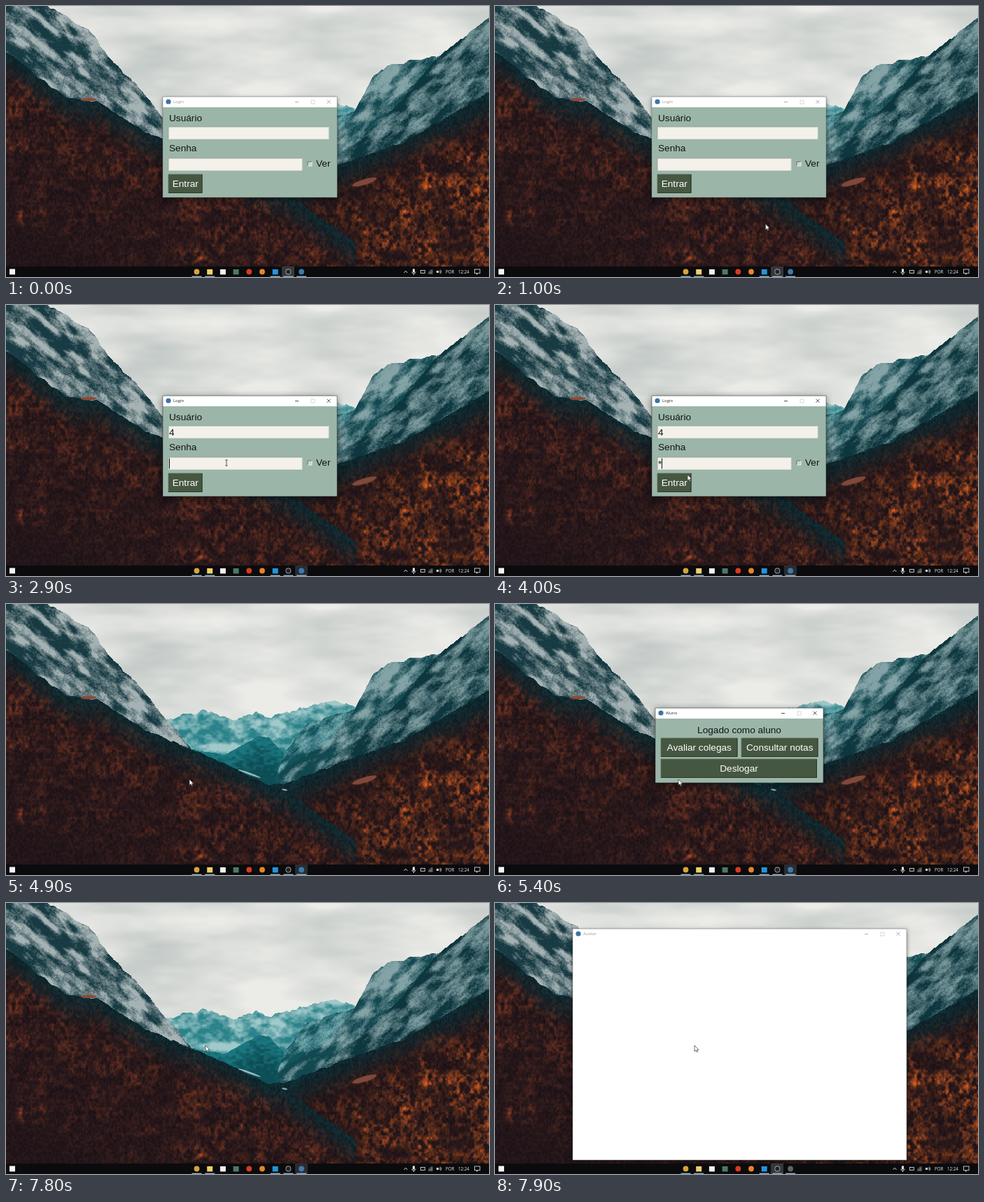
Write an HTML page with a canvas that moves like this. It is 690 px wide and 388 px high and loops after 8000 ms.

```html
<!DOCTYPE html>
<html lang="pt">
<head>
<meta charset="utf-8">
<title>Login</title>
<style>
html, body { margin: 0; width: 100%; height: 100%; overflow: hidden; background: #0b0b0c; }
canvas { display: block; width: 100vw; height: 100vh; }
</style>
</head>
<body>
<canvas id="stage" width="690" height="388"></canvas>
<script>
const W = 690, H = 388, LOOP = 8000;
const ctx = document.getElementById('stage').getContext('2d');
const SANS = '"Liberation Sans", Arial, sans-serif';
const UI = '"Open Sans", "Noto Sans", sans-serif';
const SAGE = '#9cb5a9', INK = '#101412';

const clamp = v => Math.max(0, Math.min(1, v));
const mix = (a, b, k) => a + (b - a) * k;
const blend = (a, b, k) => a.map((v, i) => mix(v, b[i], k));
const ease = k => k * k * (3 - 2 * k);

// ---- seeded noise ----
function hash(x, y) {
  let n = Math.imul(x, 374761393) + Math.imul(y, 668265263) | 0;
  n = Math.imul(n ^ (n >>> 13), 1274126177);
  return ((n ^ (n >>> 16)) >>> 0) / 4294967296;
}
function noise(x, y) {
  const i = Math.floor(x), j = Math.floor(y), u = ease(x - i), v = ease(y - j);
  return mix(mix(hash(i, j), hash(i + 1, j), u), mix(hash(i, j + 1), hash(i + 1, j + 1), u), v);
}
const fbm = (x, y) =>
  (noise(x, y) * 4 + noise(x * 2 + 9, y * 2) * 2 + noise(x * 4, y * 4 + 7)) / 7;
const glow = (x, y, cx, cy, rx, ry) => Math.exp(-(((x - cx) / rx) ** 2) - ((y - cy) / ry) ** 2);

// ---- landscape: each layer is a ridge line and a colour rule ----
function ridge(jag, ...pts) {
  return x => {
    const i = pts.findIndex(p => p[0] > x);
    if (i < 1) return Infinity;
    const [x0, y0] = pts[i - 1], [x1, y1] = pts[i];
    return mix(y0, y1, (x - x0) / (x1 - x0)) + jag * (fbm(x / 9, jag) - 0.5);
  };
}
// dir is 1 for slopes falling to the right, -1 to the left
function rock(dark, light, dir, bias) {
  return (x, y) => {
    const along = dir * x * 0.76 + y * 0.65, across = y * 0.76 - dir * x * 0.65;
    const grain = (noise(x / 1.6, y / 1.6) - 0.5) * 0.45;
    return blend(dark, light, clamp((fbm(along / 24, across / 9) - 0.5) * 2.4 + grain + bias(x, y)));
  };
}
function forest(x, y, warmth, heat, leaf) {
  const base = blend([13, 41, 47], [34, 21, 25], clamp(warmth));
  const crown = clamp((fbm(x / 5, y / 6) - 0.32) * 2);
  const patch = clamp(fbm(x / 26, y / 18) * 1.8 - 0.3);
  const shade = 0.75 + 0.5 * noise(x / 2, y / 3);
  return blend(base, leaf, heat * crown * patch).map(v => v * shade);
}
function leftForest(x, y, d) {
  const tree = glow(x, y, 48, 303, 8, 11) + glow(x, y, 22, 303, 5, 9) + glow(x, y, 265, 359, 15, 13);
  const heat = 0.75 * clamp(d / 40) * clamp(1.35 - d / 190) + 1.6 * tree;
  return forest(x, y, d / 45, Math.min(1.3, heat), [142, 62, 35]);
}
function rightForest(x, y) {
  const d = y - (262 - 0.45 * (x - 420));
  const heat = clamp(d / 75) * (0.45 + 0.55 * clamp((x - 420) / 150));
  return forest(x, y, (d + 10) / 45, heat, [188, 83, 31]);
}
function farRange(x, y, d) {
  const snow = glow(x, y, 386, 172, 11, 8) + glow(x, y, 310, 205, 42, 6) + glow(x, y, 472, 141, 12, 4);
  const k = (fbm(x / 9, y / 7) - 0.5) * 1.8 + 0.55 - d / 130 + snow;
  return blend([43, 130, 138], [160, 201, 202], clamp(k));
}
function sky(x, y) {
  const grey = glow(x, y, 190, 65, 80, 45) + 0.8 * glow(x, y, 465, 55, 85, 42) +
    glow(x, y, 690, 0, 70, 22) + 0.5 * glow(x, y, 140, 0, 80, 25);
  const k = (fbm(x / 75, y / 24) - 0.5) * 0.9 + 0.85 - 0.5 * grey;
  return blend([186, 194, 192], [235, 235, 231], clamp(k));
}
// front to back
const LAYERS = [
  [ridge(5, [0, 66], [85, 131], [130, 136], [200, 181], [264, 207], [405, 272], [500, 340]), leftForest],
  [ridge(8, [0, -40], [62, 0], [118, 33], [150, 77], [185, 111], [265, 208]),
    rock([24, 59, 67], [166, 179, 180], 1, (x, y) =>
      0.55 - 0.25 * glow(x, y, 25, 12, 55, 35) - 0.45 * glow(x, y, 148, 82, 20, 24))],
  [ridge(6, [345, 262], [400, 256], [478, 226], [570, 193], [655, 143], [691, 121]), rightForest],
  [ridge(6, [430, 256], [470, 221], [550, 150], [617, 72], [691, 14]),
    rock([13, 54, 62], [122, 153, 156], -1, (x, y) =>
      0.28 + 0.4 * glow(x, y, 602, 152, 26, 14) + 0.2 * glow(x, y, 650, 50, 30, 25))],
  [ridge(6, [390, 238], [460, 197], [497, 151], [525, 98], [550, 83], [617, 71], [640, 60]),
    rock([19, 72, 80], [131, 163, 166], -1, (x, y) => 0.62 - clamp((y - 130) / 200))],
  [ridge(5, [385, 245], [400, 208], [430, 170], [500, 150], [530, 180]),
    rock([17, 82, 91], [118, 171, 175], -1, (x, y) => 0.55 - clamp((y - 170) / 120))],
  [ridge(4, [262, 206], [310, 216], [357, 190], [375, 190], [440, 260]),
    (x, y, d) => blend([27, 120, 128], [13, 77, 86], clamp(d / 45 + noise(x / 5, y / 3) - 0.5))],
  [ridge(9, [230, 163], [285, 152], [325, 167], [358, 153], [373, 162], [430, 147], [473, 136], [510, 154]),
    farRange],
  [() => -1, sky]
];

function paintLandscape() {
  const cv = document.createElement('canvas');
  cv.width = W;
  cv.height = H;
  const g = cv.getContext('2d'), img = g.createImageData(W, H);
  for (let x = 0; x < W; x++) {
    const tops = LAYERS.map(([top]) => top(x));
    for (let y = 0; y < H; y++) {
      const i = tops.findIndex(top => y >= top);
      img.data.set([...LAYERS[i][1](x, y, y - tops[i]), 255], (y * W + x) * 4);
    }
  }
  g.putImageData(img, 0, 0);
  // bare meadows and the river
  [[118, 134, 11, 2.5, 0, '#8a4a3a'], [512, 252, 18, 4, -0.3, '#80483a'],
    [348, 243, 17, 1.3, 0.35, '#9dbabb'], [398, 266, 4, 1.2, 0.2, '#8ca4a4']
  ].forEach(([x, y, rx, ry, turn, fill]) => {
    g.fillStyle = fill;
    g.beginPath();
    g.ellipse(x, y, rx, ry, turn, 0, 7);
    g.fill();
  });
  return cv;
}
const landscape = paintLandscape();

// ---- interface parts ----
function box(x, y, w, h, fill) {
  ctx.fillStyle = fill;
  ctx.fillRect(x, y, w, h);
}
function outline(x, y, w, h, color, width = 0.8) {
  ctx.strokeStyle = color;
  ctx.lineWidth = width;
  ctx.strokeRect(x, y, w, h);
}
function disc(x, y, r, fill) {
  ctx.fillStyle = fill;
  ctx.beginPath();
  ctx.arc(x, y, r, 0, 7);
  ctx.fill();
}
function arc(x, y, r, from, to, color) {
  ctx.strokeStyle = color;
  ctx.lineWidth = 0.8;
  ctx.beginPath();
  ctx.arc(x, y, r, from, to);
  ctx.stroke();
}
function line(color, width, ...p) {
  ctx.strokeStyle = color;
  ctx.lineWidth = width;
  ctx.beginPath();
  for (let i = 0; i < p.length; i += 2) ctx.lineTo(p[i], p[i + 1]);
  ctx.stroke();
}
// two-tone edge: one colour at top left, the other at bottom right
function bevel(x, y, w, h, lit, low) {
  line(lit, 0.8, x, y + h, x, y, x + w, y);
  line(low, 0.9, x + w, y, x + w, y + h, x, y + h);
}
function text(s, x, y, size = 13.65, color = INK, font = SANS, align = 'left') {
  ctx.font = `${size}px ${font}`;
  ctx.fillStyle = color;
  ctx.textAlign = align;
  ctx.fillText(s, x, y);
}
const centred = (s, x, y, color) => text(s, x, y, 13.65, color, SANS, 'center');

function frame(x, y, w, h, title, active, body) {
  const ink = active ? '#222' : '#999', r = x + w, m = y + 7;
  ctx.save();
  ctx.shadowColor = 'rgba(0,0,0,.55)';
  ctx.shadowBlur = active ? 10 : 6;
  ctx.shadowOffsetY = 2;
  box(x, y, w, h, body);
  ctx.restore();
  box(x, y, w, 15, '#fff');
  outline(x, y, w, h, active ? 'rgba(40,50,48,.75)' : 'rgba(110,120,118,.7)', 0.7);
  disc(x + 8, y + 7, 3.6, '#3b74a5');
  text(title, x + 15, y + 9.4, 6, ink, UI);
  line(ink, 0.8, r - 60, m + 0.5, r - 55, m + 0.5);
  outline(r - 37, m - 2, 5, 5, '#d0d0d0');
  line(ink, 0.8, r - 14.5, m - 2.3, r - 9.5, m + 2.7);
  line(ink, 0.8, r - 9.5, m - 2.3, r - 14.5, m + 2.7);
}
function field(x, y, w) {
  box(x, y, w, 17.5, '#f4f0ea');
  bevel(x, y, w, 17.5, '#8d9d94', '#d9ddd5');
}
function button(x, y, w, s) {
  box(x, y, w, 27, '#465741');
  bevel(x, y, w - 0.5, 26.5, '#5d6d57', '#273324');
  centred(s, x + w / 2, y + 18.2, '#fff');
}
const caret = (x, y) => box(x, y, 1, 15, '#111');

function loginWindow(t) {
  frame(224, 130, 249, 144, 'Login', t >= 1700, SAGE);
  text('Usuário', 233, 165);
  field(232, 173, 229);
  text('Senha', 233, 208);
  field(232, 218, 191);
  box(431, 223, 6, 6, '#c9d5cd');
  bevel(431, 223, 6, 6, '#52605a', '#eef2ee');
  text('Ver', 443, 230);
  button(232, 241, 48.5, 'Entrar');
  if (t >= 2400) text('4', 233, 187);
  if (t >= 3500) text('*', 233, 232);
  if (t >= 2900) caret(t < 3500 ? 233 : 238, 219.5);
  else if (t >= 1800) caret(t < 2400 ? 232.5 : 240.5, 174.5);
}
function studentWindow() {
  frame(229, 149, 240, 107, 'Aluno', true, SAGE);
  centred('Logado como aluno', 349, 184.5);
  button(237, 192, 109.5, 'Avaliar colegas');
  button(352, 192, 109.5, 'Consultar notas');
  button(237, 222, 223, 'Deslogar');
}

const ICONS = ['#d8a33c', '#f0cf6c', '#f2f2f2', '#4c7966', '#d93a22', '#e88425', '#2494dc', '#c8cacb', '#3f79ab'];
function taskbar(recorder, dim) {
  const ink = '#e8e8e8';
  box(0, 373, W, 15, '#0b0b0d');
  box(recorder ? 394 : 413, 373, 18, 15, recorder ? '#34383a' : '#292d30');
  box(5, 376.5, 8, 8, '#f4f4f4');
  ICONS.forEach((color, i) => {
    const x = 272.5 + i * 18.7;
    if ([1, 2, 3, 6].includes(i)) box(x - 4, 377, 8, 7.5, color);
    else disc(x, 380.5, 3.9, i === 8 && dim ? '#5f6660' : color);
    if (i === 7) disc(x, 380.5, 3.2, '#222528');
    if (i < 2 || i > 5) box(x - 7, 386.7, 14, 1.3, '#91b4cc');
  });
  // tray: chevron, microphone, battery, network, speaker, clock, notices
  line(ink, 0.9, 568.5, 382, 571, 379.2, 573.5, 382);
  box(581, 376.5, 3, 5, ink);
  arc(582.5, 380.5, 2.7, 0, Math.PI, ink);
  box(582, 383, 1, 2, ink);
  outline(592.5, 378.5, 6, 4, ink);
  for (let r = 1; r < 7; r += 1.7) arc(609.5, 383.7, r, Math.PI, Math.PI * 1.5, r < 5 ? ink : '#909090');
  box(615, 379, 3, 3, ink);
  for (let r = 2; r < 5; r += 1.7) arc(618, 380.5, r, -0.9, 0.9, ink);
  text('POR', 628, 382.7, 6.2, ink, UI);
  text('12:24', 646, 382.7, 6.2, ink, UI);
  outline(669.5, 377, 7.5, 5.7, ink);
  box(672, 383, 1.5, 1.5, ink);
}

// ---- pointer: start, end, goal ----
const MOVES = [
  [500, 1700, 331, 180], [2400, 2800, 315, 226], [3600, 4000, 275, 243], [4000, 4500, 262, 251],
  [6300, 6600, 280, 217], [6600, 7000, 282, 208], [7200, 7300, 293, 205], [7300, 7500, 285, 204]
];
function pointer(t) {
  const [x, y] = MOVES.reduce((p, [from, to, ...goal]) =>
    blend(p, goal, ease(clamp((t - from) / (to - from)))), [420, 392]);
  const inField = t < 4900 && x > 232 && x < 423 && (Math.abs(y - 182) < 9 || Math.abs(y - 226.5) < 8.5);
  if (inField) {
    line('#333', 0.8, x, y - 4, x, y + 4);
    [-4, 4].forEach(dy => line('#333', 0.8, x - 1.8, y + dy, x + 1.8, y + dy));
    return;
  }
  ctx.save();
  ctx.translate(x, y);
  ctx.fillStyle = '#fff';
  ctx.strokeStyle = '#222';
  ctx.lineWidth = 0.65;
  const arrow = new Path2D('M0 0V8.5L2 6.7 3.3 9.5 4.7 8.9 3.4 6.2H6Z');
  ctx.fill(arrow);
  ctx.stroke(arrow);
  ctx.restore();
}

function draw(t) {
  const opening = t >= 5000 && t < 5100, rating = t >= 7900;
  ctx.drawImage(landscape, 0, 0);
  if (t < 4900) loginWindow(t);
  else if (opening) frame(229, 149, 240, 107, 'Aluno', false, '#fff');
  else if (t >= 5100 && t < 7700) studentWindow();
  else if (rating) frame(111, 37, 477, 331, 'Avaliar', false, '#fff');
  taskbar(t < 1700 || opening || rating, opening || rating);
  pointer(t);
}

const start = performance.now();
function tick() {
  draw((performance.now() - start) % LOOP);
  requestAnimationFrame(tick);
}
tick();
</script>
</body>
</html>
```
